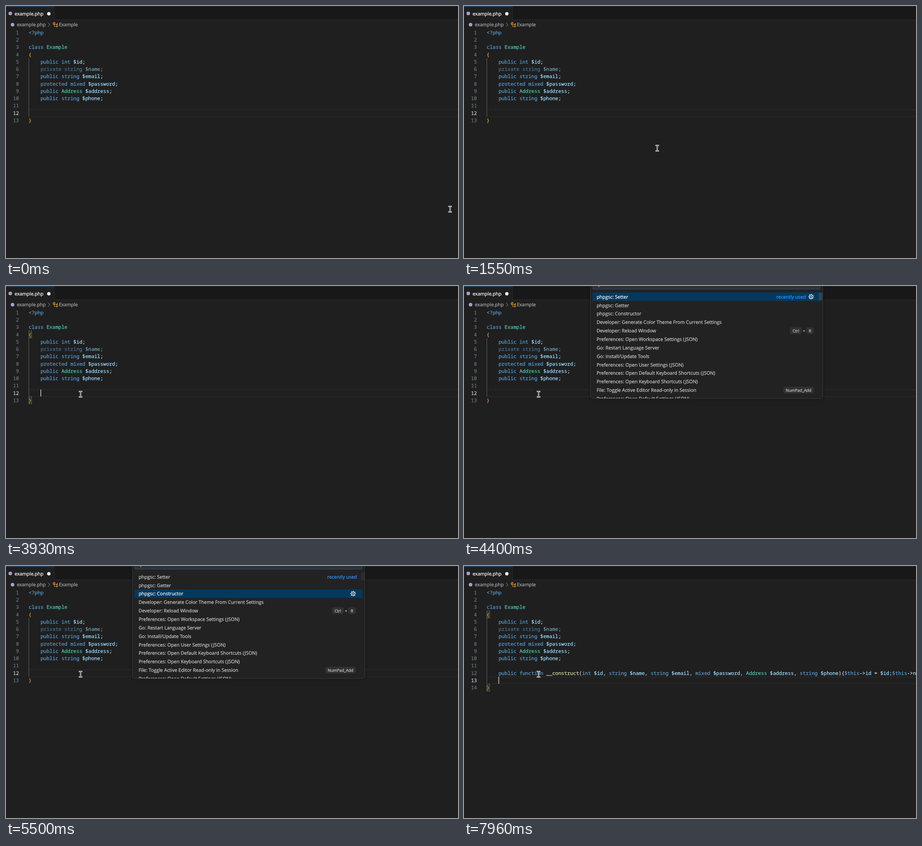
Write an HTML page that moves like this. It is 1000 by 560 pixels and loops after 8000 ms.

```html
<!DOCTYPE html>
<html lang="en">
<head>
<meta charset="utf-8">
<title>Constructor generator</title>
<style>
  html, body { margin: 0; width: 100%; height: 100%; overflow: hidden; background: #1f1f1f; }
  svg { display: block; width: 100vw; height: 100vh; }
  text { text-rendering: geometricPrecision; white-space: pre; fill: currentColor; stroke: currentColor; stroke-width: .25px; }
  .code { font: 11px "Noto Sans Mono", "DejaVu Sans Mono", monospace; }
  .ui { font: 10.5px "Open Sans", "Noto Sans", sans-serif; color: #ccc; }
  .key { font-size: 8.9px; text-anchor: middle; }
</style>
</head>
<body>
<svg id="stage" viewBox="0 0 1000 560">
  <defs>
    <clipPath id="panelClip"><path d="M280 0H793.5V249.5H280z"/></clipPath>
    <filter id="shadow" x="-5%" y="-5%" width="110%" height="115%">
      <feDropShadow dx="0" dy="0" stdDeviation="3.5" flood-color="#000" flood-opacity=".45"/>
    </filter>
  </defs>
  <rect width="1000" height="560" fill="#1f1f1f"/>

  <g id="tabs">
    <rect x="107" width="893" height="31" fill="#181818"/>
    <path d="M0 .5H1000M107 30.5H1000M107.3 1V31" stroke="#2b2b2b" fill="none"/>
    <path d="M0 1.5H107" stroke="#0a4f87"/>
    <circle cx="9.5" cy="16.6" r="4" fill="#a59fc6"/>
    <text class="ui" x="19" y="21.2" style="color:#fff">example.php</text>
    <circle cx="94.8" cy="17.2" r="3.7" fill="#fff"/>
  </g>

  <g id="crumbs">
    <circle cx="14.5" cy="41.4" r="4" fill="#a59fc6"/>
    <text class="ui" x="24" y="45.3" style="color:#a9a9a9">example.php</text>
    <path d="M93.2 37.4l4 4-4 4" fill="none" stroke="#a9a9a9"/>
    <g transform="translate(102.3 34.6) scale(.857)" fill="none" stroke="#ee9d28" stroke-width="1.2">
      <path d="M5.3 1.4L7.4 3.4 3.3 7.4 1.4 5.4zM5.3 6V12.3H10.6M5.3 7.3H10.6"/>
      <path d="M13 5.5l1.3 1.2-2.6 2.6-1.3-1.2zM13 10.5l1.3 1.2-2.6 2.6-1.3-1.2z"/>
    </g>
    <text class="ui" x="117" y="45.3" style="color:#a9a9a9">Example</text>
  </g>

  <g id="editor" class="code"></g>
  <g id="mouse" fill="none" stroke-linecap="square"></g>
  <g id="panel"></g>
</svg>
<script>
const LOOP = 8000;
const NS = "http://www.w3.org/2000/svg";
const $ = id => document.getElementById(id);

function add(parent, tag, attrs = {}, content) {
  const el = document.createElementNS(NS, tag);
  for (const name in attrs) el.setAttribute(name, attrs[name]);
  if (content !== undefined) el.textContent = content;
  parent.appendChild(el);
  return el;
}
const show = (el, on) => el.setAttribute("visibility", on ? "visible" : "hidden");

// Editor
const CHAR = 6.597, LEFT = 50.1, LINE = 16.277;
const midY = n => 58.9 + (n - 1) * LINE;
const baseY = n => midY(n) + 3.8;
const C = { plain: "#d4d4d4", key: "#569cd6", type: "#4ec9b0", name: "#9cdcfe", func: "#dcdcaa", gold: "#e8b01e", salmon: "#e0954a" };
const KEYWORDS = /^(public|private|protected|class|function|int|string|mixed|php|\$this|<\?php)$/;

function colorOf(token, before) {
  if (KEYWORDS.test(token)) return C.key;
  if (token[0] === "$" || before.endsWith("->")) return C.name;
  if (/^[A-Z]/.test(token)) return C.type;
  if (token === "__construct") return C.func;
  return C.plain;
}

function codeLine(parent, n, src, paint = colorOf) {
  const g = add(parent, "g");
  for (const m of src.matchAll(/<\?php|\$?\w+|->|[^\s\w]/g)) {
    const color = paint(m[0], src.slice(0, m.index));
    add(g, "text", { x: LEFT + m.index * CHAR, y: baseY(n), color }, m[0]);
  }
  return g;
}

function lineNumber(parent, n, active) {
  add(parent, "text", { x: 28.6, y: baseY(n), "text-anchor": "end", color: active ? "#cccccc" : "#6e7681" }, n);
}

function bracketBox(parent, n) {
  add(parent, "rect", { x: LEFT + .4, y: midY(n) - 7.6, width: CHAR - .4, height: 15.2, fill: "#1c241c", stroke: "#7d7d7d", "stroke-width": .85 });
}

// Everything that depends on which line holds the caret
function caretScene(active) {
  const g = add(editor, "g");
  const top = midY(active) - LINE / 2, bottom = top + LINE;
  add(g, "path", { d: `M50 ${top + .8}H1000M50 ${bottom - .8}H1000`, stroke: "#2a2a2a", "stroke-width": 1.5 });
  add(g, "path", { d: `M50.6 ${midY(5) - LINE / 2}V${bottom - .8}`, stroke: "#606060" });
  for (let n = 12; n <= active + 1; n++) lineNumber(g, n, n === active);
  const boxes = add(g, "g");
  bracketBox(boxes, 4);
  bracketBox(boxes, active + 1);
  const close = add(g, "text", { x: LEFT, y: baseY(active + 1), color: C.gold }, "}");
  const caret = add(g, "rect", { x: 76.2, y: top + .2, width: 1.5, height: LINE - .8, fill: "#d0d0d0" });
  return { g, boxes, close, caret };
}

const editor = $("editor");
const before = caretScene(12), after = caretScene(13);
for (let n = 1; n <= 11; n++) lineNumber(editor, n, false);

const source = [
  "<?php", "", "class Example", "",
  "    public int $id;",
  "    private string $name;",
  "    public string $email;",
  "    protected mixed $password;",
  "    public Address $address;",
  "    public string $phone;"
];
source.forEach((src, i) => {
  const g = codeLine(editor, i + 1, src);
  if (src.includes("private")) g.setAttribute("opacity", .65);
});
const openBrace = add(editor, "text", { x: LEFT, y: baseY(4), color: C.gold }, "{");

const built = "    public function __construct(int $id, string $name, string $email, mixed $password, " +
  "Address $address, string $phone){$this->id = $id;$this->name = $name;";
const builtPlain = codeLine(editor, 12, built, token => token === ")" ? "#c9a3c6" : C.plain);
const builtColored = codeLine(editor, 12, built);

// Mouse pointer: dark core with a light rim
const beam = "M-2.5 -6.2H-1.2L0 -5.2L1.2 -6.2H2.5M0 -5V5M-2.5 6.2H-1.2L0 5.2L1.2 6.2H2.5";
add($("mouse"), "path", { d: beam, stroke: "#f4f4f4", "stroke-width": 2.7 });
add($("mouse"), "path", { d: beam, stroke: "#111", "stroke-width": .8 });

const path = [
  [360, 982.5, 451.5], [780, 832, 408], [1200, 616, 352.5], [1550, 427.5, 316],
  [2040, 225, 271.5], [2180, 185, 268], [2320, 168, 254], [2390, 165, 247],
  [2530, 170, 241], [2865, 170, 241], [3060, 165, 240.5]
];

function pointerAt(t) {
  const step = t < 2600 ? 70 : 65;
  const origin = t < 2600 ? 430 : 2930;
  const q = origin + Math.floor((t - origin) / step) * step;
  if (q <= path[0][0]) return path[0].slice(1);
  const i = path.findIndex(p => p[0] >= q);
  if (i < 0) return path[path.length - 1].slice(1);
  const [t0, x0, y0] = path[i - 1], [t1, x1, y1] = path[i];
  const k = (q - t0) / (t1 - t0);
  return [x0 + (x1 - x0) * k, y0 + (y1 - y0) * k];
}

// Command palette
const ROW = 18.857, ROW_TOP = 14.3;
const rowMid = i => ROW_TOP + ROW * (i + .5);
const rowBase = i => rowMid(i) + 4;
const commands = [
  "phpgsc: Setter", "phpgsc: Getter", "phpgsc: Constructor",
  "Developer: Generate Color Theme From Current Settings",
  "Developer: Reload Window",
  "Preferences: Open Workspace Settings (JSON)",
  "Go: Restart Language Server",
  "Go: Install/Update Tools",
  "Preferences: Open User Settings (JSON)",
  "Preferences: Open Default Keyboard Shortcuts (JSON)",
  "Preferences: Open Keyboard Shortcuts (JSON)",
  "File: Toggle Active Editor Read-only in Session",
  "Preferences: Open Default Settings (JSON)"
];

const panel = $("panel");
add(panel, "rect", { x: 279.7, y: -20, width: 514, height: 270, rx: 5, fill: "#222222", stroke: "#3a3a3a", filter: "url(#shadow)" });
add(panel, "rect", { x: 285, y: -20, width: 502.6, height: 27, rx: 1.5, fill: "#313131", stroke: "#1c5f97", "stroke-width": .9 });
const inputCaret = add(panel, "rect", { x: 297.8, y: -10, width: 1.1, height: 12.6, fill: "#ccc" });
const list = add(panel, "g", { "clip-path": "url(#panelClip)" });
const selection = add(list, "rect", { x: 284.3, width: 504.4, height: ROW, fill: "#04395d" });
const slider = add(list, "rect", { x: 785, y: 15, width: 8.4, height: 17, fill: "#797979" });
const labels = commands.map((name, i) => add(list, "text", { class: "ui", x: 293.4, y: rowBase(i) }, name));
const recent = add(list, "text", { class: "ui", y: rowBase(0), "text-anchor": "end", style: "color:#3794ff" }, "recently used");

function keyCap(x0, x1, row, label) {
  const y = rowMid(row);
  add(list, "rect", { x: x0, y: y - 6.6, width: x1 - x0, height: 13.4, rx: 2.5, fill: "#303030", stroke: "#3a3a3a", "stroke-width": .8 });
  add(list, "text", { class: "ui key", x: (x0 + x1) / 2, y: y + 3.4 }, label);
}
keyCap(721.8, 746.6, 4, "Ctrl");
add(list, "text", { class: "ui key", x: 752.2, y: rowMid(4) + 3.4 }, "+");
keyCap(757.8, 773.2, 4, "R");
keyCap(707, 773.2, 11, "NumPad_Add");

const gear = add(list, "g", { fill: "none", stroke: "#fff" });
const tooth = 2 * Math.PI * 5 / 16;
add(gear, "circle", { r: 5, "stroke-width": 1.8, "stroke-dasharray": tooth, "stroke-dashoffset": tooth / 2 });
add(gear, "circle", { r: 4, "stroke-width": 1 });
add(gear, "circle", { r: 1.6, "stroke-width": 1 });

function drawPanel(t) {
  const open = t >= 4330 && t < 5970;
  panel.style.display = open ? "" : "none";
  if (!open) return;
  const row = t < 5360 ? 0 : t < 5500 ? 1 : 2;
  selection.setAttribute("y", ROW_TOP + row * ROW);
  gear.setAttribute("transform", `translate(768 ${rowMid(row)})`);
  recent.setAttribute("x", row ? 776.3 : 756.5);
  labels.forEach((el, i) => el.style.color = i === row ? "#fff" : "#ccc");
  slider.setAttribute("opacity", t < 5080 ? .3 : .12);
  show(inputCaret, t < 4800 || t >= 5360);
}

function drawEditor(t) {
  const inserted = t >= 5970, colored = t >= 6040;
  before.g.style.display = inserted ? "none" : "";
  after.g.style.display = inserted ? "" : "none";
  builtPlain.style.display = inserted && !colored ? "" : "none";
  builtColored.style.display = colored ? "" : "none";

  const focused = t >= 2930 && t < 4330;
  show(before.boxes, focused);
  show(before.caret, focused && (t < 3450 || t >= 3930));
  show(after.boxes, colored);
  show(after.caret, t < 6440 || (t >= 6970 && t < 7430) || t >= 7960);
  openBrace.setAttribute("color", t >= 4400 && !colored ? C.salmon : C.gold);
  before.close.setAttribute("color", t >= 4400 ? C.salmon : C.gold);
}

function draw(t) {
  drawEditor(t);
  drawPanel(t);
  $("mouse").setAttribute("transform", `translate(${pointerAt(t).join(" ")})`);
}

const start = performance.now();
function tick() {
  draw((performance.now() - start) % LOOP);
  requestAnimationFrame(tick);
}
tick();
</script>
</body>
</html>
```
